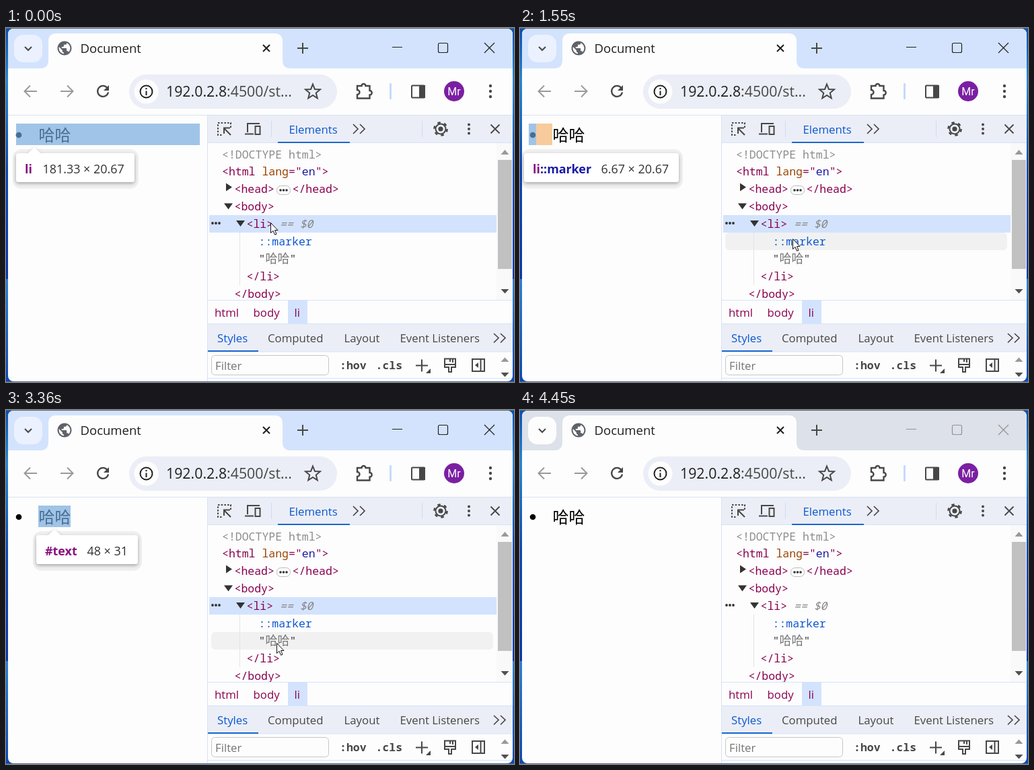
These frames come from a looping animation (755 px wide and 526 px high, 4470 ms). An HTML page:

```html
<!DOCTYPE html>
<html lang="en">
<head>
<meta charset="utf-8">
<title>Element inspector</title>
<style>
  html, body { margin: 0; width: 100%; height: 100%; overflow: hidden; background: #fff; }
  svg { display: block; width: 755px; height: 526px; }
  text { white-space: pre; }
  .ui { font: 16.8px "Open Sans", "Noto Sans", sans-serif; fill: #474747; }
  .tip { font: 17.9px "Open Sans", "Noto Sans", sans-serif; fill: #333; }
  .code { font: 16.5px "Noto Sans Mono", "DejaVu Sans Mono", monospace; fill: #8a004f; }
  .cjk { font-family: "Noto Sans CJK SC", "Noto Sans CJK", sans-serif; }
  .line { fill: none; stroke: #474747; stroke-width: 2; }
</style>
</head>
<body>
<svg id="stage" viewBox="0 0 755 526" xmlns="http://www.w3.org/2000/svg">
  <defs>
    <linearGradient id="desk" x2="0" y2="1">
      <stop offset="0" stop-color="#0c4fae"/>
      <stop offset=".15" stop-color="#2487d4"/>
      <stop offset=".4" stop-color="#0b47b4"/>
      <stop offset=".71" stop-color="#0a36a8"/>
      <stop offset=".71" stop-color="#2a80d4"/>
      <stop offset="1" stop-color="#0d46b0"/>
    </linearGradient>
    <filter id="shadow" x="-20%" y="-50%" width="140%" height="200%">
      <feDropShadow dx="0" dy="2" stdDeviation="2.5" flood-opacity=".33"/>
    </filter>
    <clipPath id="window"><rect x="3" y="1" width="750" height="524" rx="8"/></clipPath>
    <clipPath id="tree"><rect x="300" y="171" width="429" height="233"/></clipPath>
  </defs>

  <rect width="755" height="526" fill="url(#desk)"/>
  <rect width="755" height="1" fill="#5b6573"/>
  <rect y="525" width="755" height="1" fill="#4d6489"/>

  <g clip-path="url(#window)">
    <rect width="755" height="526" fill="#fdfdfd"/>

    <!-- tab strip -->
    <rect id="strip" width="755" height="60"/>
    <rect id="tabMenu" x="12" y="10" width="42" height="41" rx="14"/>
    <path class="line" d="M28 28l5 5 5-5" stroke="#1f1f1f"/>
    <path d="M51 60q12 0 12-12V20q0-12 12-12H399q12 0 12 12V48q0 12 12 12Z" fill="#fdfdfd"/>
    <path transform="translate(74.4 17.4) scale(1.05)" fill="#5f6368" d="M12 2C6.5 2 2 6.5 2 12s4.500 10 10 10 10-4.500 10-10S17.500 2 12 2zm-1 17.900c-4-.5-7-3.800-7-7.900 0-.6.1-1.200.2-1.800L9 15v1c0 1.100.9 2 2 2zm6.900-2.500c-.3-.8-1-1.400-1.900-1.400h-1v-3c0-.5-.5-1-1-1H8v-2h2c.5 0 1-.5 1-1V7h2c1.100 0 2-.9 2-2v-.4c2.900 1.200 5 4.100 5 7.400 0 2.100-.8 4-2.100 5.400z"/>
    <text class="ui" x="110.500" y="37" style="font-size:18.500px;fill:#1f1f1f">Document</text>
    <path class="line" style="stroke:#1f1f1f" d="M382 25l10 10m0-10l-10 10"/>
    <path class="line" d="M433 30h16m-8-8v16"/>
    <g id="controls" fill="none" stroke-width="1.200">
      <path d="M574 28.500h15M711 22l15 15m0-15l-15 15"/>
      <rect x="642.500" y="22.500" width="14" height="14" rx="2"/>
    </g>

    <!-- address bar -->
    <path class="line" style="stroke:#9a9a9a" d="M46 94H28m8-8.500L27.500 94l8.500 8.500M81 94h18m-8-8.500l8.500 8.500-8.500 8.500"/>
    <path class="line" style="stroke-width:2.300" d="M150.500 89A8 8 0 1 0 152 95.500"/>
    <path d="M153 85v8h-8z" fill="#474747"/>
    <rect x="183" y="69" width="309" height="51" rx="25.500" fill="#ebeef6"/>
    <circle cx="208.500" cy="94.500" r="18" fill="#fdfdfd"/>
    <circle class="line" cx="208.500" cy="94.500" r="9" style="stroke:#1f1f1f"/>
    <path class="line" style="stroke:#1f1f1f" d="M208.500 89v2.200m0 2.300v6.500"/>
    <text class="ui" x="238" y="102" style="font-size:21.300px"><tspan fill="#1f1f1f">192.0.2.8</tspan>:4500/st...</text>
    <path id="star" class="line"/>
    <path class="line" style="stroke-width:2.400" d="M522 86h6.500a3 3 0 0 1 6 0h6v7a3 3 0 0 1 0 6.500v5H522v-5.500a3.500 3.500 0 0 0 0-7z"/>
    <rect x="570" y="82" width="3" height="24" rx="1" fill="#c6dafb"/>
    <rect class="line" x="603" y="85.500" width="19" height="18" rx="1"/>
    <rect x="614" y="85" width="9" height="19" fill="#474747"/>
    <circle cx="666" cy="94" r="15" fill="#7b1fa2"/>
    <text x="666" y="100" text-anchor="middle" style="font:16px Roboto,sans-serif;fill:#fff">Mr</text>
    <g id="menus" fill="#474747"></g>
    <rect x="3" y="129" width="750" height="1" fill="#d9e2f2"/>

    <!-- page -->
    <circle cx="19" cy="159" r="4.300"/>
    <text class="cjk" x="48.500" y="168" font-size="24">哈哈</text>
    <g id="overlay"></g>

    <!-- inspector tool bar -->
    <rect x="299" y="130" width="1" height="396" fill="#d8e2f3"/>
    <rect x="300" y="130" width="453" height="40" fill="#ebeef6"/>
    <rect x="300" y="170" width="453" height="1" fill="#d3e3fd"/>
    <path class="line" stroke-dasharray="2.500 2.200" d="M334 148v-7H315v18h7"/>
    <path class="line" d="M334 159l-10-10m0 8v-8.500h9"/>
    <path class="line" d="M377 142H359v13M355 157.500h13"/>
    <rect class="line" x="370.500" y="146" width="7" height="12"/>
    <path d="M394.500 138v24M618.500 138v24" stroke="#cadcfa"/>
    <text class="ui" x="420.500" y="157" style="fill:#0b57d0">Elements</text>
    <rect x="404" y="169" width="107" height="2" fill="#1967d2"/>
    <path class="line" style="stroke-width:1.700" d="M516 143l7 7-7 7m10-14l7 7-7 7M725 454l7 6.500-7 7m10-13.500l7 6.500-7 7"/>
    <g class="line">
      <circle cx="646" cy="150" r="7.500"/>
      <circle cx="646" cy="150" r="9.600" stroke-width="2.500" stroke-dasharray="4.500 5.550"/>
      <circle cx="646" cy="150" r="2.600" fill="#474747"/>
    </g>
    <path class="line" style="stroke-width:1.800" d="M720.500 143.500l13 13m0-13l-13 13"/>

    <!-- element tree -->
    <g clip-path="url(#tree)">
      <rect id="selected" x="302" y="278" width="427" height="26" fill="#d3e3fd"/>
      <rect id="hover" x="305" width="419" height="26" rx="6" fill="#f1f1f1"/>
      <path d="M347.500 304v78" stroke="#dfe3ea"/>
      <g id="code"></g>
      <rect x="402.500" y="234.500" width="20" height="13" rx="6" fill="#fdfdfd" stroke="#bbb"/>
      <path d="M327 230.500v12l9-6zM324 260.500h13l-6.500 9zM342 286h13l-6.500 9z" fill="#333"/>
    </g>

    <!-- scroll bars -->
    <rect x="729" y="171" width="24" height="233" fill="#f9f9f9"/>
    <rect x="731" y="196" width="21" height="162" fill="#c1c1c1"/>
    <path d="M735.500 188h12l-6-7z" fill="#999"/>
    <path d="M735.500 388h12l-6 6.500z" fill="#505050"/>

    <!-- breadcrumbs -->
    <rect x="300" y="404" width="453" height="1" fill="#d3e3fd"/>
    <rect id="crumb" x="357" y="405" width="62" height="34" fill="#f1f1f1"/>
    <rect x="419" y="405" width="29" height="34" fill="#d3e3fd"/>
    <g id="labels"></g>

    <!-- styles pane -->
    <path d="M300 481h453M300 520.500h453" stroke="#d3e3fd"/>
    <rect x="300" y="479" width="75" height="2" fill="#1967d2"/>
    <rect x="305.500" y="486.500" width="174" height="29" rx="5" fill="#fdfdfd" stroke="#c4c7c5"/>
    <text class="ui" x="311" y="508" style="fill:#757575">Filter</text>
    <text class="code" x="496" y="507" style="font-weight:700;fill:#474747">:hov</text>
    <text class="code" x="549.500" y="507" style="font-weight:700;fill:#474747">.cls</text>
    <path class="line" d="M609 501.500h18m-9-9v18"/>
    <path d="M631 506v7h-7z" fill="#474747"/>
    <path class="line" d="M652 500v-8.500h16V500zM652 500v4h6v7h4v-7h6v-4M660 492v4M664 492v5"/>
    <rect class="line" x="693" y="492" width="18" height="18"/>
    <path class="line" d="M705.500 492v18"/>
    <path d="M702 497v8l-5-4z" fill="#474747"/>
    <path d="M735.500 496h12l-6-6.500z" fill="#999"/>
    <path d="M735.500 512h12l-6 6.500z" fill="#505050"/>
  </g>

  <path id="cursor" d="M.5.5V15.500L4 12.300 6.600 18.300 9 17.300 6.500 11.500H11Z" fill="#fff" stroke="#111"/>
</svg>

<script>
const LOOP = 4470;
const BLUE = 'rgba(111,168,220,.66)';
const ORANGE = 'rgba(246,178,107,.66)';
const $ = id => document.getElementById(id);
const show = (id, on) => $(id).setAttribute('visibility', on ? 'visible' : 'hidden');
const fill = (id, color) => $(id).setAttribute('fill', color);
const span = (text, color) => `<tspan fill="${color}">${text}</tspan>`;
const dots = (points, r) => points.map(([x, y]) => `<circle cx="${x}" cy="${y}" r="${r}"/>`).join('');

// Start time, cursor position, inspected node
const steps = [
  [0, [393, 289], 'item'],
  [1180, [399, 295], 'item'],
  [1300, [403, 304], 'item'],
  [1550, [405, 313], 'marker'],
  [2230, [405, 314], 'marker'],
  [2380, [405, 319], 'marker'],
  [2530, [405, 326], 'marker'],
  [2680, [405, 335], 'text'],
  [2800, [404, 346], 'text'],
  [3360, [402, 346], 'text'],
  [3510, [390, 458], 'crumb'],
  [3630, null, 'none'],
  [4450, null, 'blurred']
];

function tooltip(x, width, arrow, name, size, sizeX) {
  const tip = arrow ? `<path d="M${arrow - 10} 187l10-10 10 10z"/>` : '';
  return `<rect x="${x - 5}" y="180" width="${width + 11}" height="59" rx="13" fill="#f0f0f0"/>
    <g fill="#fff" filter="url(#shadow)">${tip}<rect x="${x}" y="186" width="${width}" height="43" rx="4"/></g>
    <text class="tip" y="216"><tspan x="${x + 13}" font-weight="700" fill="#881280">${name}</tspan><tspan x="${sizeX}">${size}</tspan></text>`;
}

const box = (x, width, color) => `<rect x="${x}" y="142" width="${width}" height="32" fill="${color}"/>`;
const itemView = box(15, 273, BLUE) + tooltip(15, 176, 42, 'li', '181.33 × 20.67', 54.5);
const overlays = {
  item: itemView,
  crumb: itemView,
  marker: box(13, 11, BLUE) + box(24, 24, ORANGE) +
    tooltip(6, 230, 0, 'li' + span('::marker', '#1a1aa6'), '6.67 × 20.67', 120.5),
  text: box(48, 48, BLUE) + tooltip(45, 151, 72, '#text', '48 × 31', 120.5)
};

function buildStatic() {
  $('code').innerHTML = [
    [321, 194, span('&lt;!DOCTYPE html&gt;', '#8c8c8c')],
    [321, 219, '&lt;html ' + span('lang', '#994500') + '="' + span('en', '#1a1aa6') + '"&gt;'],
    [339.5, 245, '&lt;head&gt;'],
    [425.5, 245, '&lt;/head&gt;'],
    [339.5, 271, '&lt;body&gt;'],
    [357.5, 297, '&lt;li&gt;'],
    [407, 297, '<tspan fill="#858585" font-style="italic">== $0</tspan>'],
    [375.5, 323, span('::marker', '#0b57d0')],
    [375.5, 349, span('"<tspan class="cjk" font-size="18" fill="#777">哈哈</tspan>"', '#333')],
    [357.5, 375, '&lt;/li&gt;'],
    [339.5, 401, '&lt;/body&gt;']
  ].map(([x, y, html]) => `<text class="code" x="${x}" y="${y}">${html}</text>`).join('') +
    `<g fill="#333">${dots([[307, 290], [312, 290], [317, 290]], 1.9)}</g>`;
  $('code').insertAdjacentHTML('afterend', '');

  const label = (x, y, text, color) => `<text class="ui" x="${x}" y="${y}" style="fill:${color}">${text}</text>`;
  $('labels').innerHTML =
    label(310, 429, 'html', '#8a004f') + label(367.5, 429, 'body', '#8a004f') + label(428.5, 429, 'li', '#8a004f') +
    '<rect x="300" y="439" width="453" height="42" fill="#ebeef6"/><path d="M300 439.5h453" stroke="#d3e3fd"/>' +
    label(314, 467, 'Styles', '#0b57d0') + label(389, 467, 'Computed', '#474747') +
    label(502.5, 467, 'Layout', '#474747') + label(585.5, 467, 'Event Listeners', '#474747') +
    '<path class="line" style="stroke-width:1.7" d="M725 454l7 6.500-7 7m10-13.500l7 6.500-7 7"/>';

  $('menus').innerHTML = dots([[720, 86], [720, 94], [720, 102]], 2.2);
  $('hover').parentNode.insertAdjacentHTML('beforeend',
    `<g fill="#333">${dots([[408, 241], [412.5, 241], [417, 241]], 1.8)}</g>`);
  $('tree').ownerSVGElement.querySelector('#menus').insertAdjacentHTML('afterend', '');
  $('cursor').insertAdjacentHTML('beforebegin',
    `<g fill="#474747">${dots([[688, 143.5], [688, 150], [688, 156.5]], 2)}</g>`);

  const star = Array.from({ length: 10 }, (_, i) => {
    const angle = i * Math.PI / 5, r = i % 2 ? 5 : 11.5;
    return `${456 + r * Math.sin(angle)} ${95 - r * Math.cos(angle)}`;
  });
  $('star').setAttribute('d', `M${star.join('L')}Z`);
}

function render(time) {
  const [, pointer, node] = steps.findLast(([start]) => start <= time);
  const blurred = node === 'blurred';
  $('overlay').innerHTML = overlays[node] || '';
  show('cursor', pointer);
  if (pointer) $('cursor').setAttribute('transform', `translate(${pointer})`);
  show('hover', node === 'marker' || node === 'text');
  $('hover').setAttribute('y', node === 'marker' ? 304 : 330);
  show('crumb', node === 'crumb');
  show('selected', !blurred);
  fill('strip', blurred ? '#dde1e9' : '#d3e3fd');
  fill('tabMenu', blurred ? '#fdfdfd' : '#ebf1fe');
  $('controls').setAttribute('stroke', blurred ? '#929292' : '#1f1f1f');
}

buildStatic();
const origin = performance.now();
function tick() {
  render((performance.now() - origin) % LOOP);
  requestAnimationFrame(tick);
}
tick();
</script>
</body>
</html>
```
